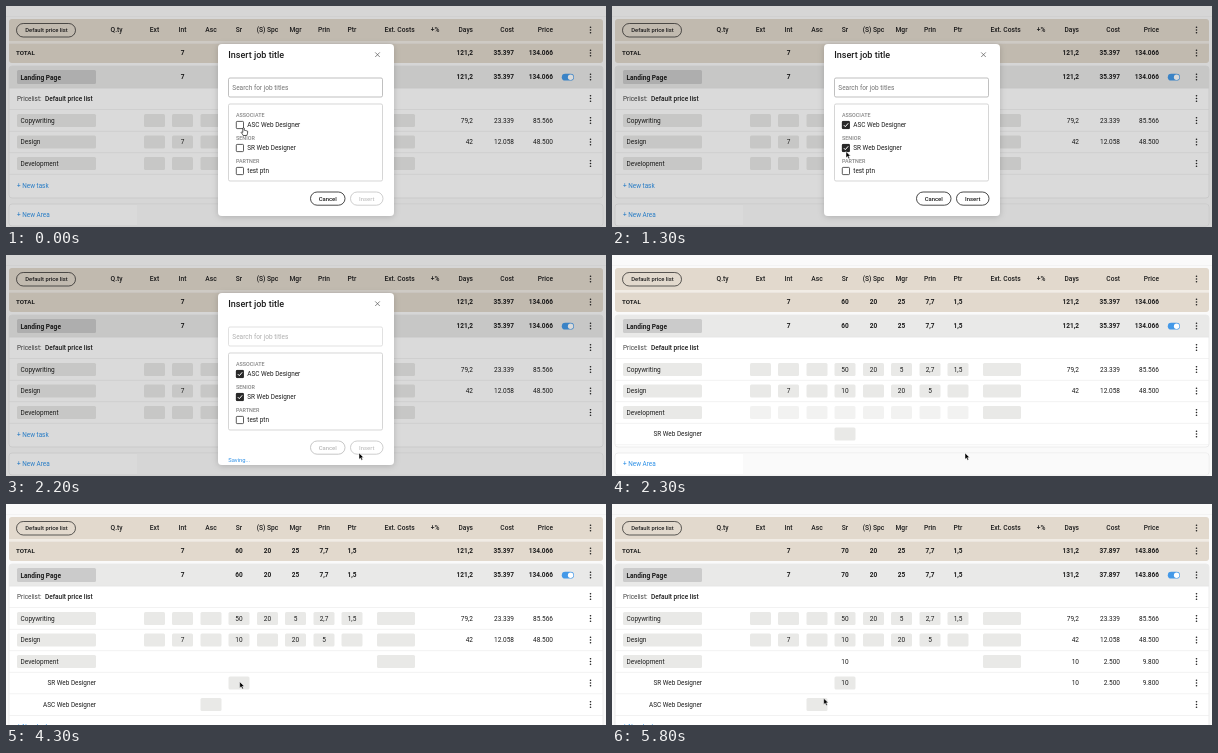
An HTML page for the animation above (5.9 s loop, 600 by 221 pixels).

```html
<!DOCTYPE html>
<html lang="en">
<head>
<meta charset="utf-8">
<title>Price list</title>
<style>
html, body { margin: 0; width: 100%; height: 100%; overflow: hidden; background: #fafafa; }
svg { display: block; width: 600px; height: 221px; font-family: Roboto, "Open Sans", sans-serif; }
</style>
</head>
<body>
<svg id="stage" viewBox="0 0 600 221" xmlns="http://www.w3.org/2000/svg"></svg>
<script>
const LOOP = 5900;
const INK = '#1d1d1d', BLUE = '#2b8fe6', CELL = '#e9e9e7';
const COLS = [148.5, 176.5, 205, 233, 261.5, 289.5, 318, 346];
const ENDS = [467, 508, 547];
const ROW = { copy: 114.5, design: 136, dev: 157.5, sr: 179, asc: 200.5 };

// Text is placed by its vertical centre.
const text = (x, y, s, o = {}) => {
  const { size = 6.4, weight = 400, fill = INK, anchor = 'start', id = '' } = o;
  return `<text ${id && `id="${id}"`} x="${x}" y="${y + size * 0.355}" font-size="${size}" ` +
    `font-weight="${weight}" fill="${fill}" text-anchor="${anchor}">${s}</text>`;
};
const rect = (x, y, w, h, fill, r = 0, more = '') =>
  `<rect x="${x}" y="${y}" width="${w}" height="${h}" rx="${r}" fill="${fill}" ${more}/>`;
const line = (y, color = '#ededed') => rect(3, y, 594, 0.7, color);
const group = (id, body, more = '') => `<g id="${id}" ${more}>${body}</g>`;
const mid = (x, y, s, o = {}) => text(x, y, s, { anchor: 'middle', ...o });
const kebab = y => [-2.8, 0, 2.8].map(d =>
  `<circle cx="584.5" cy="${y + d}" r=".8" fill="${INK}"/>`).join('');
const cell = (x, y, w = 21) => rect(x - w / 2, y - 6.5, w, 13, CELL, 1.5);
const cells = y => COLS.map(x => cell(x, y)).join('');
const values = (y, list, o) => list.map((s, i) => s ? mid(COLS[i], y, s, o) : '').join('');
const amounts = (y, list, o, ids) => list.map((s, i) =>
  text(ENDS[i], y, s, { anchor: 'end', size: 6.5, ...o, id: ids ? ids + i : '' })).join('');

const bold = { weight: 600, size: 6.5 };
const SUM = ['121,2', '35.397', '134.066'];
const NEW_SUM = ['131,2', '37.897', '143.866'];
const EXTRA = ['10', '2.500', '9.800'];

function sumRow(y, key) {
  return values(y, ['', '7', '', '', '20', '25', '7,7', '1,5'], bold) +
    mid(COLS[3], y, '60', { ...bold, id: key + 'Sr' }) +
    amounts(y, SUM, bold, key) + kebab(y);
}

function taskRow(y, name, list, sums) {
  return rect(11, y - 6.5, 79, 13, CELL, 1.5) + text(14.5, y, name, { size: 6.5 }) +
    cell(390, y, 38) + values(y, list, { size: 6.5 }) + amounts(y, sums) + kebab(y) + line(y + 10.4);
}

function header() {
  const names = ['Ext', 'Int', 'Asc', 'Sr', '(S) Spc', 'Mgr', 'Prin', 'Ptr'];
  const head = { size: 6.7, weight: 500 };
  return rect(0, 0, 600, 221, '#fafafa') + rect(0, 10.5, 600, 0.6, '#eeeeee') +
    `<path d="M3 35V16q0-3 3-3h588q3 0 3 3v19z" fill="#e2d9cd"/>` +
    rect(3, 35, 594, 2.5, '#f1ece5') +
    `<path d="M3 37.500h594v16.500q0 3-3 3H6q-3 0-3-3z" fill="#e2d9cd"/>` +
    rect(10.5, 17.5, 59, 13.5, 'none', 6.75, `stroke="${INK}" stroke-width=".7"`) +
    mid(40.5, 24.2, 'Default price list', { size: 5.8, weight: 500 }) +
    mid(110.5, 24, 'Q.ty', head) + values(24, names, head) +
    mid(393.5, 24, 'Ext. Costs', head) + mid(429, 24, '+%', head) +
    amounts(24, ['Days', 'Cost', 'Price'], { size: 6.6, weight: 500 }) + kebab(24) +
    text(10, 47, 'TOTAL', { size: 6.2, weight: 600 }) + sumRow(47, 'total');
}

function area() {
  const rows =
    `<path d="M3 82V63q0-3 3-3h588q3 0 3 3v19z" fill="#e9e9e8"/>` +
    rect(11, 64, 79, 14, '#cbcbcb', 1.5) +
    text(14.5, 71.2, 'Landing Page', { size: 6.6, weight: 600 }) + sumRow(71, 'area') +
    rect(555.8, 67.8, 12.2, 6.8, '#4499e8', 3.4) + '<circle cx="564.6" cy="71.200" r="2.700" fill="#fff"/>' +
    line(81.7, '#e0e0e0') +
    text(11, 92.5, 'Pricelist:', { fill: '#444' }) +
    text(39, 92.5, 'Default price list', { size: 6.5, weight: 500 }) + kebab(92.5) + line(103.3) +
    cells(ROW.copy) + cells(ROW.design) + group('devCells', cells(ROW.dev)) +
    taskRow(ROW.copy, 'Copywriting', ['', '', '', '50', '20', '5', '2,7', '1,5'], ['79,2', '23.339', '85.566']) +
    taskRow(ROW.design, 'Design', ['', '7', '', '10', '', '20', '5', ''], ['42', '12.058', '48.500']) +
    taskRow(ROW.dev, 'Development', [], []) +
    group('jobs',
      text(90, ROW.sr, 'SR Web Designer', { anchor: 'end' }) + cell(COLS[3], ROW.sr) + kebab(ROW.sr) +
      mid(COLS[3], ROW.sr, '', { id: 'typed', size: 6.5 }) + line(189.5) +
      text(90, ROW.asc, 'ASC Web Designer', { anchor: 'end' }) + cell(COLS[2], ROW.asc) +
      kebab(ROW.asc) + line(211)) +
    group('extra', mid(COLS[3], ROW.dev, '10', { size: 6.5 }) +
      amounts(ROW.dev, EXTRA) + amounts(ROW.sr, EXTRA)) +
    group('newTask', text(11, 179.3, '+ New task', { fill: BLUE })) +
    rect(233, 175.5, 0.7, 7, INK, 0, 'id="caret"');
  return `<clipPath id="clip"><rect id="clipBox" x="0" y="58" width="600" height="134"/></clipPath>` +
    rect(3, 60, 594, 132, '#fff', 3, 'id="card" stroke="#e6e6e6" stroke-width=".7"') +
    group('rows', rows, 'clip-path="url(#clip)"') +
    group('newArea', rect(3, 198, 594, 22, '#fff', 3, 'stroke="#e6e6e6" stroke-width=".7"') +
      rect(131, 198.5, 465, 21, '#fafafa') + text(11, 208.8, '+ New Area', { fill: BLUE }));
}

function option(y, label, name, id) {
  return text(230, y - 9.7, label, { size: 5.4, weight: 500, fill: '#858585' }) +
    rect(230.3, y - 3.6, 7.2, 7.2, '#fff', 0.8, 'stroke="#333" stroke-width=".8"') +
    (id ? group(id, rect(230, y - 3.9, 7.8, 7.8, '#292929', 1) +
      `<path d="M231.800 ${y + 0.1}l1.500 1.600l2.900-3.400" fill="none" stroke="#fff" stroke-width="1"/>`) : '') +
    text(241.3, y, name);
}

function button(id, x, w, label) {
  return group(id, rect(x, 186, w, 13.2, '#fff', 6.6, 'stroke="currentColor" stroke-width=".8"') +
    mid(x + w / 2, 192.6, label, { size: 5.9, weight: 500, fill: 'currentColor' }));
}

function modal() {
  return rect(0, 0, 600, 221, '#000', 0, 'opacity=".145"') +
    rect(212, 38, 176, 172, '#fff', 4, 'filter="url(#shadow)"') +
    text(222.3, 48.8, 'Insert job title', { size: 9, weight: 500 }) +
    '<path d="M369.200 46.400l4.600 4.600m0-4.600l-4.600 4.600" stroke="#555" stroke-width=".7"/>' +
    rect(222.5, 72, 154, 19, '#fff', 1.5, 'id="searchBox" stroke-width=".7"') +
    text(226.3, 81.7, 'Search for job titles', { id: 'search', size: 6.5 }) +
    rect(222.5, 98, 154, 77, '#fff', 1.5, 'stroke="#c4c4c4" stroke-width=".7"') +
    option(119, 'ASSOCIATE', 'ASC Web Designer', 'checkAsc') +
    option(142, 'SENIOR', 'SR Web Designer', 'checkSr') +
    option(165, 'PARTNER', 'test ptn') +
    button('cancel', 304.5, 34.5, 'Cancel') + button('insert', 344.5, 32.5, 'Insert') +
    text(222.3, 205.3, 'Saving...', { id: 'saving', size: 5.8, fill: BLUE });
}

const cursors =
  '<path id="arrow" d="M0 0V6.300L1.500 5L2.500 7.300L3.700 6.800L2.700 4.600H4.600Z" fill="#000" stroke="#fff" stroke-width=".5"/>' +
  '<path id="hand" d="M-.700 .500Q0-.500 .700 .500V2.800Q1.500 2.300 2 3Q2.800 2.700 3.200 3.400Q4.200 3.200 4.200 4.300Q4.200 6.300 3.300 8H-.300Q-1 6.500-2.300 5Q-2.200 3.900-.700 4.900Z" fill="#fff" stroke="#111" stroke-width=".7"/>';

document.getElementById('stage').innerHTML =
  '<filter id="shadow" x="-20%" y="-20%" width="140%" height="140%">' +
  '<feDropShadow dx="0" dy="1" stdDeviation="3" flood-opacity=".18"/></filter>' +
  header() + area() + group('modal', modal()) + group('cursor', cursors);

const $ = id => document.getElementById(id);
const show = (id, on) => { $(id).style.display = on ? '' : 'none'; };
const set = (id, name, v) => $(id).setAttribute(name, v);
const clamp = v => Math.max(0, Math.min(1, v));
const ease = v => v * v * (3 - 2 * v);

// Pointer stops: time, x, y
const PATH = [
  [0, 237.5, 121.5], [500, 237.5, 121.5], [900, 234, 142.5], [1200, 234, 143],
  [1300, 234, 145.5], [1800, 353, 196], [2200, 353, 198], [2700, 353, 198],
  [3000, 281, 187], [3100, 250, 181], [3200, 233.7, 177.7],
  [5450, 233.7, 177.7], [5700, 211.7, 194.2], [5900, 211.7, 194.2]
];

function pointer(t) {
  const i = PATH.findIndex((p, n) => n > 0 && t <= p[0]);
  const [a, b] = [PATH[i - 1], PATH[i]];
  const k = (t - a[0]) / (b[0] - a[0]);
  const e = t > 2600 && t < 3300 ? k : ease(k);
  return [a[1] + (b[1] - a[1]) * e, a[2] + (b[2] - a[2]) * e];
}

function draw(t) {
  const open = t < 2300, saving = t >= 1900, done = t >= 5700;
  const ready = t >= 400 && !saving;

  show('modal', open);
  show('checkAsc', t >= 400);
  show('checkSr', t >= 1100);
  show('saving', saving);
  $('cancel').style.color = saving ? '#b9b9b9' : INK;
  $('insert').style.color = ready ? INK : '#c2c2c2';
  set('search', 'fill', saving ? '#b0b0b0' : '#747474');
  set('searchBox', 'stroke', saving ? '#d5d5d5' : '#a5a5a5');

  const grow = open ? 0 : 43 * ease(clamp((t - 2300) / 300));
  set('card', 'height', 132 + grow);
  set('clipBox', 'height', 134 + grow);
  set('newArea', 'transform', `translate(0 ${grow})`);
  set('newTask', 'transform', `translate(0 ${open ? 0 : 43})`);
  set('devCells', 'opacity', open ? 1 : 0.55 * clamp((2500 - t) / 200));
  show('jobs', !open);

  $('typed').textContent = t < 5000 ? '' : t < 5200 ? '1' : '10';
  const typing = t >= 5000 && t < 5500;
  show('caret', (t >= 3800 && t < 4300) || (t >= 4800 && t < 5600));
  set('caret', 'x', t < 5000 ? 233 : t < 5200 ? 235 : 237);

  show('extra', done);
  for (const key of ['total', 'area']) {
    $(key + 'Sr').textContent = done ? '70' : '60';
    (done ? NEW_SUM : SUM).forEach((s, i) => { $(key + i).textContent = s; });
  }

  const [x, y] = pointer(t);
  const hand = t < 600 || (t >= 850 && t < 1250) || (t >= 1700 && t < 1900);
  set('cursor', 'transform', `translate(${x} ${y})`);
  show('cursor', !typing);
  show('hand', hand);
  show('arrow', !hand);
}

const start = performance.now();
function tick() {
  draw((performance.now() - start) % LOOP);
  requestAnimationFrame(tick);
}
tick();
</script>
</body>
</html>
```
